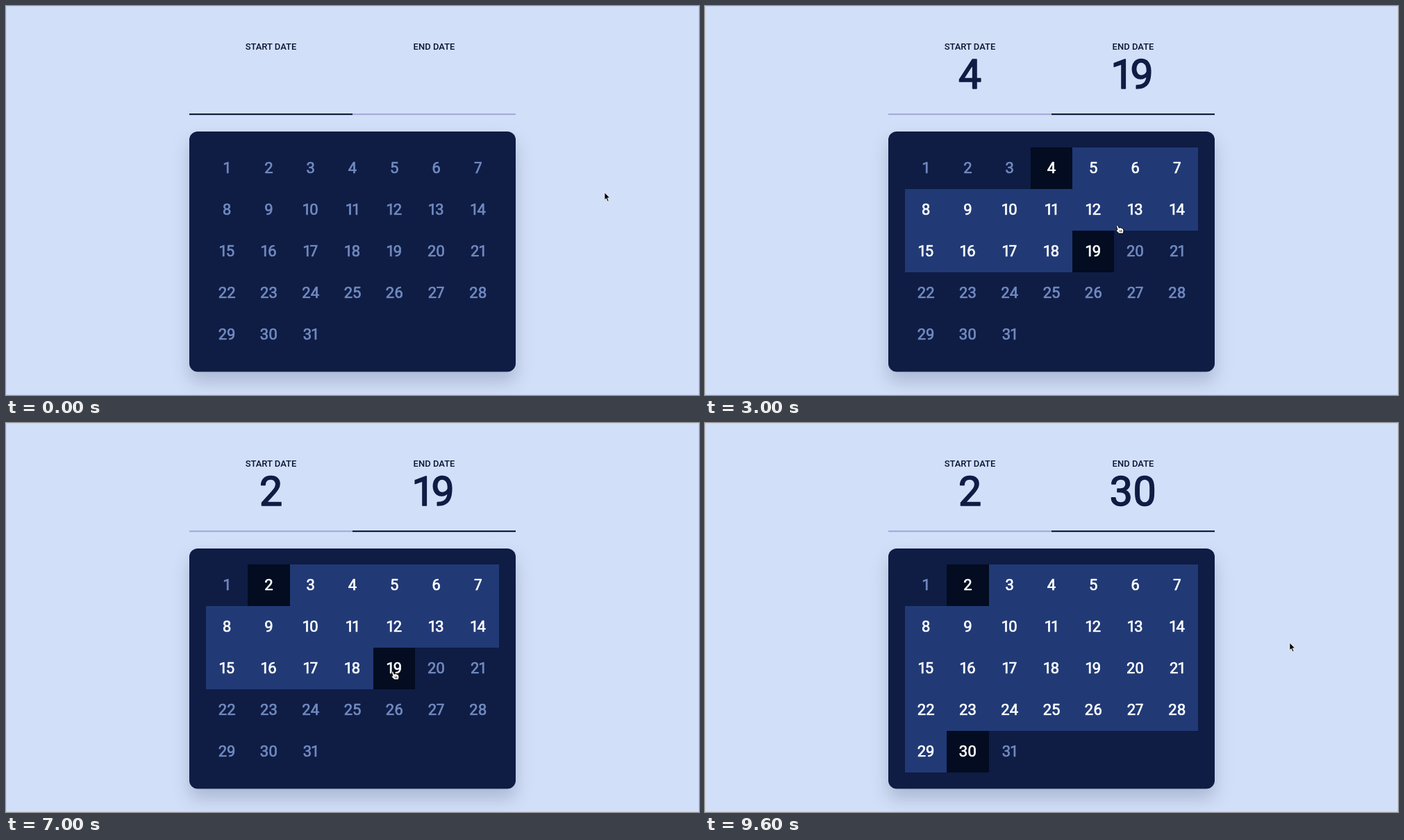
Write an HTML page that moves like this. It is 998 px wide and 561 px high and loops after 10 s.

```html
<!DOCTYPE html>
<html lang="en">
<head>
<meta charset="utf-8">
<title>Date range picker</title>
<style>
  html, body { margin: 0; width: 100%; height: 100%; overflow: hidden; background: #d2dff8; }
  svg { display: block; width: 998px; height: 561px; }
  text {
    font-family: Roboto, sans-serif; font-variant-numeric: proportional-nums;
    text-anchor: middle; stroke-linejoin: round;
  }
  .label { font-size: 13px; font-weight: 500; fill: #0b1436; }
  .value { font-size: 59px; fill: #0f1d45; stroke: #0f1d45; stroke-width: 1.6px; }
  .day { font-size: 22px; stroke-width: .7px; }
  .card { fill: #0f1c44; filter: drop-shadow(0 14px 12px rgba(20, 30, 70, .2)); }
</style>
</head>
<body>
<svg id="stage" viewBox="0 0 998 561">
  <rect x=".5" y=".5" width="997" height="560" fill="none" stroke="#c7d5f1"/>
  <rect class="card" x="264" y="181" width="470" height="346.5" rx="12"/>
</svg>
<script>
const STEP = 0.2, LOOP = 10, END = 9.6;
const GRID = { x: 288, y: 204.3, w: 422 / 7, h: 60 };
const TABS = { x: 264, y: 155, w: 235 };
const COLORS = { dim: '#718bc0', range: '#213a76', edge: '#030c20', bar: '#a5abdb', active: '#0f1c44' };

// The pointer moves straight between stops and rests one step before each click.
const stops = [], clicks = [];
const move = (at, x, y) => stops.push({ at, x, y });
const click = (at, x, y) => {
  move(at - STEP, x, y);
  move(at, x, y);
  clicks.push({ at, x, y });
};

move(0, 862, 269);
click(1, 500, 240);
click(2, 561, 361);
move(2.2, 690, 392);
move(2.4, 804, 386);
move(3, 595, 316);
move(3.6, 323, 107);
click(4.2, 440, 300);
move(4.6, 521, 356);
move(4.8, 560, 392);
click(5.6, 381, 118);
move(5.8, 362, 208);
move(6, 349, 228);
click(6.4, 364, 236);
click(7, 558, 358);
move(7.2, 748, 376);
click(8, 685, 393);
click(9, 378, 470);
move(END, 842, 317);

const stage = document.getElementById('stage');

function set(el, attrs) {
  for (const name in attrs) el.setAttribute(name, attrs[name]);
}

function add(tag, attrs, content = '') {
  const el = document.createElementNS('http://www.w3.org/2000/svg', tag);
  set(el, attrs);
  el.textContent = content;
  return stage.appendChild(el);
}

const fields = ['START DATE', 'END DATE'].map((label, i) => {
  const left = TABS.x + TABS.w * i, x = left + TABS.w / 2;
  add('text', { class: 'label', x, y: 63 }, label);
  return {
    value: add('text', { class: 'value', x, y: 119.3 }),
    bar: add('rect', { x: left, y: TABS.y, width: TABS.w, height: 2.2 })
  };
});

const cells = Array.from({ length: 31 }, (_, i) => {
  const x = GRID.x + GRID.w * (i % 7), y = GRID.y + GRID.h * Math.floor(i / 7);
  return {
    box: add('rect', { x, y, width: GRID.w, height: GRID.h, 'shape-rendering': 'crispEdges' }),
    text: add('text', { class: 'day', x: x + GRID.w / 2, y: y + 36.2 }, i + 1)
  };
});

const arrow = add('path', {
  d: 'M0 0V10.6L2.4 8.4 4.2 12.7 6 11.9 4.2 7.8H7.6Z',
  fill: '#000', stroke: '#fff', 'stroke-width': .7
});
const hand = add('path', {
  d: 'M-2.5 1.5Q-1.6-.6-.2 1L1.2 4.2 2.8 3.6 5 4.2 7 5 8 8 7.2 12H1.2L-2.8 8Q-3.5 6.2-1 7Z' +
     'M2.2 7.5L3 10M4.3 7.2L5 10',
  fill: '#fff', stroke: '#000', 'stroke-width': .9, 'stroke-linejoin': 'round'
});

function pointerAt(time) {
  const next = Math.max(1, stops.findIndex(stop => stop.at >= time - 1e-6));
  const a = stops[next - 1], b = stops[next];
  const k = (time - a.at) / (b.at - a.at);
  return { x: a.x + (b.x - a.x) * k, y: a.y + (b.y - a.y) * k };
}

function dayAt({ x, y }) {
  const col = Math.floor((x - GRID.x) / GRID.w), row = Math.floor((y - GRID.y) / GRID.h);
  const day = row * 7 + col + 1;
  return col >= 0 && col < 7 && row >= 0 && day <= 31 ? day : 0;
}

function tabAt({ x, y }) {
  const tab = Math.floor((x - TABS.x) / TABS.w);
  return y < TABS.y && tab >= 0 && tab < 2 ? tab : -1;
}

// Replays the clicks so far: a day fills the active field, a tab selects one.
function selectionAt(time) {
  const dates = [0, 0];
  let active = 0;
  for (const point of clicks) {
    if (point.at > time + 1e-6) break;
    const day = dayAt(point);
    if (day) dates[active] = day;
    active = day ? 1 : tabAt(point);
  }
  return { dates, active };
}

function draw(time) {
  const { dates, active } = selectionAt(time);
  const [start, end] = dates;
  const pointer = pointerAt(time), hover = dayAt(pointer);
  const settled = hover === dayAt(pointerAt(Math.max(0, time - STEP)));
  const rangeEnd = end || hover;

  fields.forEach(({ value, bar }, i) => {
    value.textContent = dates[i] || '';
    set(bar, { fill: i === active ? COLORS.active : COLORS.bar });
  });
  cells.forEach(({ box, text }, i) => {
    const day = i + 1;
    const edge = day === start || day === end;
    const inRange = start && day > start && day <= rangeEnd;
    const filled = inRange || (day === hover && settled);
    const ink = edge || inRange || day === hover ? '#fff' : COLORS.dim;
    set(box, { fill: edge ? COLORS.edge : filled ? COLORS.range : 'none' });
    set(text, { fill: ink, stroke: ink });
  });

  const clickable = hover || tabAt(pointer) >= 0;
  set(hand, { visibility: clickable ? 'visible' : 'hidden' });
  set(arrow, { visibility: clickable ? 'hidden' : 'visible' });
  set(clickable ? hand : arrow, { transform: `translate(${pointer.x} ${pointer.y})` });
}

const begin = performance.now();
function tick() {
  const time = (performance.now() - begin) / 1000 % LOOP;
  draw(Math.min(END, Math.floor(time / STEP + 1e-6) * STEP));
  requestAnimationFrame(tick);
}
tick();
</script>
</body>
</html>
```
